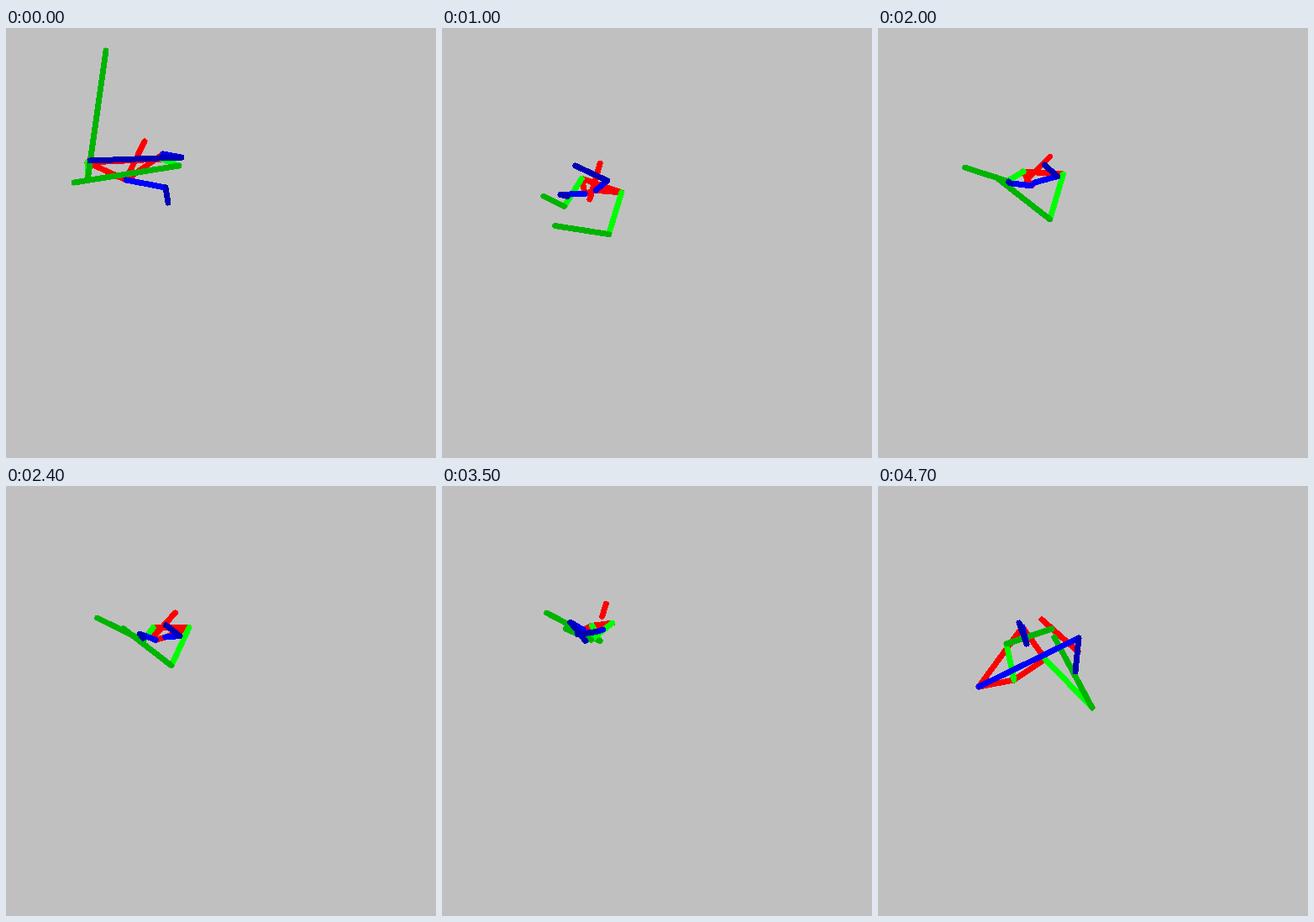
Write an HTML page that moves like this. It is 512 by 512 pixels and loops after 4800 ms.

```html
<!DOCTYPE html>
<html lang="en">
<head>
<meta charset="utf-8">
<title>Stick figure</title>
<style>
html, body { margin: 0; width: 100%; height: 100%; overflow: hidden; background: #c0c0c0; }
svg { display: block; width: 512px; height: 512px; }
line { stroke-width: 7; stroke-linecap: round; shape-rendering: crispEdges; }
</style>
</head>
<body>
<svg id="stage" viewBox="0 0 512 512"></svg>
<script>
const STEP = 100, STEPS = 48;
const SETTLED = 4, BREAK = 40, LAST = STEPS - 1;
const RED = '#ff0000', GREEN = '#00ff00', DARK_GREEN = '#00b400';
const BLUE = '#0000ff', DARK_BLUE = '#0000b4';

const mix = (a, b, u) => a + (b - a) * u;
const mixPoint = (p, q, u) => p.map((v, i) => mix(v, q[i], u));
const ease = u => (1 - Math.cos(Math.PI * u)) / 2;

// The body sinks and rises: turning points as [step, height].
const DIPS = [[SETTLED, -1], [11, 1], [20, 0], [32, -1], [BREAK, 0.6]];

function bobAt(step) {
  const i = Math.max(1, DIPS.findIndex(d => step <= d[0]));
  const [a, from] = DIPS[i - 1], [b, to] = DIPS[i];
  return mix(from, to, ease((step - a) / (b - a)));
}

// Four shared motions: bob (up and down), sway, its double-speed wobble, and a slow turn.
function motionAt(step) {
  const phase = 2 * Math.PI * (step - 20) / 40;
  return { B: bobAt(step), S: Math.cos(phase), W: Math.cos(2 * phase), T: (step - 22) / 18 };
}

// A joint leaves its start point, follows the shared motions, then breaks away to its end point.
const joint = (start, end, move) => step => {
  const settled = Math.min(BREAK, Math.max(SETTLED, step));
  const place = move(motionAt(settled));
  if (step < SETTLED) return mixPoint(start, place, step / SETTLED);
  if (step > BREAK) return mixPoint(place, end, (step - BREAK) / (LAST - BREAK));
  return place;
};

const head = joint([165, 135], [195, 159], ({ B, S, W, T }) =>
  [196 + 4 * S + 1.6 * T - 2 * B + 5 * W, 150 + 4.9 * S - 3 * T + 8 * B - 2 * W]);
const neck = joint([144, 178], [238, 197], ({ B, S, W, T }) =>
  [182.4 - 4.7 * S + 3.9 * T - 4.3 * B, 177 + 5.4 * S - 12.5 * T + 17.4 * B - 3 * W]);

const shoulderL = joint([97, 160], [162, 231], ({ B, S, T }) =>
  [173 + S + 7.4 * T - 1.9 * B, 171 + 9.2 * B]);
const elbowL = joint([97, 182], [153, 188], ({ B, S, W, T }) =>
  [164 - 4.5 * S + 25 * T - 5.4 * B - 3 * W, 190 + 1.6 * S + 10.7 * T + 24 * B - 8 * W]);
const handL = joint([119, 27], [207, 170], ({ B, S, W, T }) =>
  [118 - 10.6 * S - 3.8 * T - 4 * B - 4 * W, 167 + 8 * T + 42.7 * B]);

const shoulderR = joint([186, 156], [199, 206], ({ B, S, T }) =>
  [211 + 9.5 * S + 3 * B, 175.5 - 2.3 * S - 7.1 * T + 17.4 * B]);
const elbowR = joint([206, 164], [255, 264], ({ B, S, W, T }) =>
  [192.5 + 6.2 * S - 13.3 * T + 1.9 * B + 4.5 * W, 214.5 + 8.1 * S - 18.2 * T + 24.6 * B + 3.2 * W]);
const handR = joint([81, 184], [210, 180], ({ B, S, W, T }) =>
  [142 - 5.5 * S - 0.7 * T - 4.1 * B + 4 * W, 190 - 10.3 * S - 9.3 * T + 40.4 * B - 3 * W]);

const hipL = joint([143, 181], [120, 239], ({ B, S, W, T }) =>
  [172.8 + 5.6 * S + 1.1 * T + 2.3 * B + 4 * W, 184 + 2.8 * S - 9.3 * T + 7.9 * B]);
const kneeL = joint([190, 190], [239, 181], ({ B, S, W, T }) =>
  [151.7 + 5.9 * S - 2 * T - 13.4 * B, 180 - 16.6 * T + 11.5 * B + 3 * W]);
const footL = joint([193, 208], [235, 221], ({ B, S, W, T }) =>
  [160.6 + 4.4 * T - 14.1 * B - 4.5 * W, 189.6 - 8 * S - 13.8 * T + 1.8 * B]);

const hipR = joint([187, 150], [172, 168], ({ B, S, W, T }) =>
  [187.7 + 1.6 * S + 4.5 * T - 3.9 * B - 2 * W, 181.3 + 2 * S - 6 * T + 8.9 * B]);
const kneeR = joint([209, 154], [177, 188], ({ B, S, W, T }) =>
  [196 + 13.5 * S - T + 4.5 * B + 4 * W, 177.2 + 3.1 * S - 3.4 * T - 1.9 * B - 4 * W]);
const footR = joint([100, 158], [168, 163], ({ B, S, W, T }) =>
  [171.8 + 18.8 * S + 1.6 * T - 4.3 * B + 8 * W, 169.7 - 6.9 * S - 2.7 * T - 8.3 * B]);

const chain = (joints, colors) => colors.map((color, i) => ({ color, from: joints[i], to: joints[i + 1] }));

const stage = document.getElementById('stage');
const bones = [
  ...chain([head, neck], [RED]),
  ...chain([shoulderL, shoulderR, hipR, hipL, shoulderL], [RED, RED, RED, RED]),
  ...chain([shoulderL, elbowL, handL], [GREEN, DARK_GREEN]),
  ...chain([shoulderR, elbowR, handR], [GREEN, DARK_GREEN]),
  ...chain([hipL, kneeL, footL], [BLUE, DARK_BLUE]),
  ...chain([hipR, kneeR, footR], [BLUE, DARK_BLUE])
];
for (const bone of bones) {
  bone.line = document.createElementNS('http://www.w3.org/2000/svg', 'line');
  bone.line.setAttribute('stroke', bone.color);
  stage.append(bone.line);
}

function draw(step) {
  for (const { line, from, to } of bones) {
    const [x1, y1] = from(step), [x2, y2] = to(step);
    for (const [name, value] of Object.entries({ x1, y1, x2, y2 })) line.setAttribute(name, value);
  }
}

const start = performance.now();
function tick() {
  const time = Math.max(0, performance.now() - start);
  draw(Math.floor(time / STEP) % STEPS);
  requestAnimationFrame(tick);
}
tick();
</script>
</body>
</html>
```
